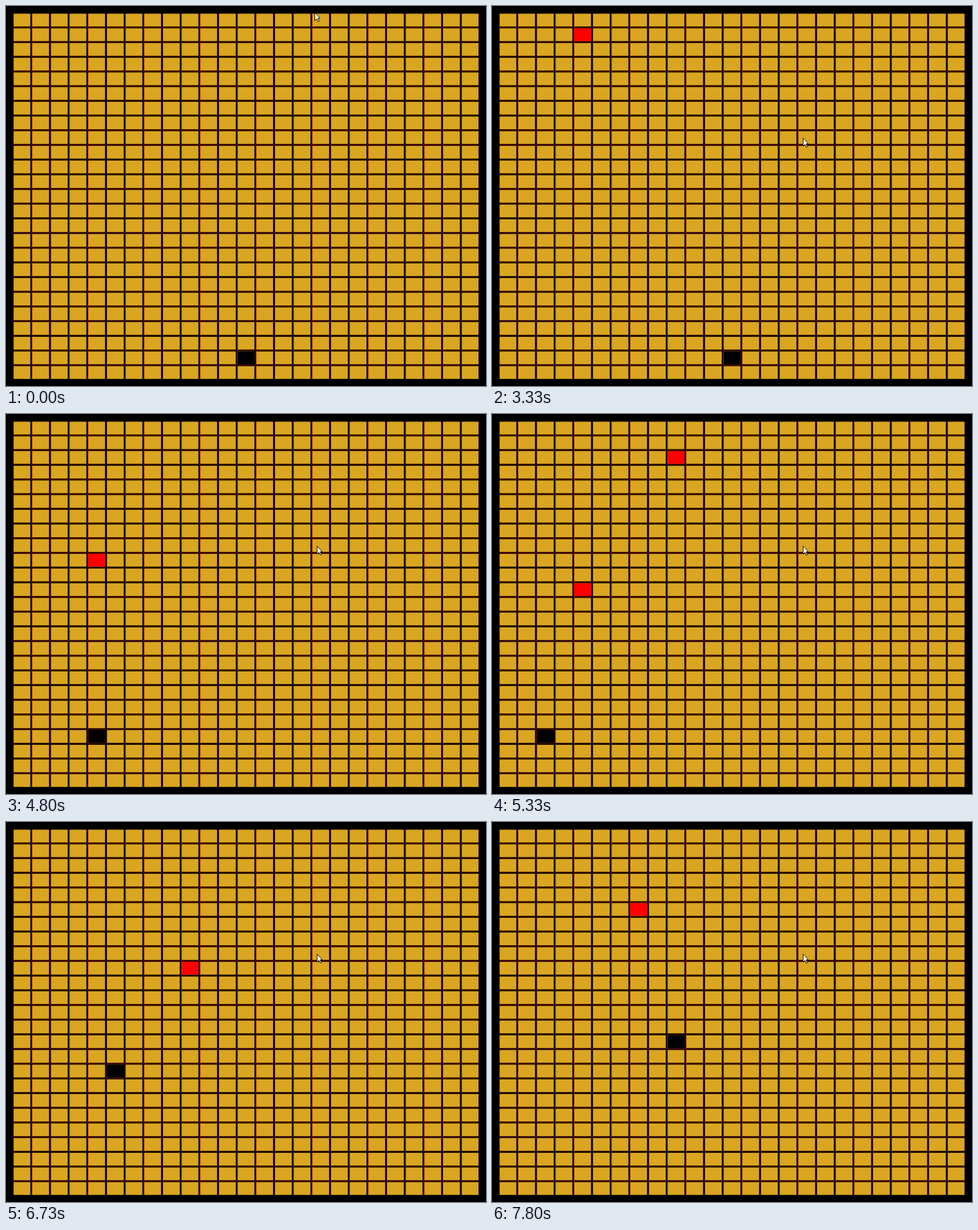
An HTML page with a canvas that plays this animation: 840x666 px, repeating every 8 s.

```html
<!DOCTYPE html>
<html lang="en">
<head>
<meta charset="utf-8">
<title>Grid game</title>
<style>
html, body { margin: 0; width: 100%; height: 100%; overflow: hidden; background: #000; }
canvas { display: block; }
</style>
</head>
<body>
<canvas id="stage" width="840" height="666"></canvas>
<script>
const W = 840, H = 666, LOOP = 8000, FPS = 15, SIZE = 25;
const GOLD = '#daa520', RED = '#ff0000', BLACK = '#000';
const PITCH = { x: 32.68, y: 25.74 };
const CELL = { w: 29.3, h: 22.4 };
const ctx = document.getElementById('stage').getContext('2d');

// Linear interpolation through [time, ...values] keys.
function track(keys, t) {
  const next = keys.findIndex(k => k[0] > t);
  if (next < 0) return keys[keys.length - 1].slice(1);
  if (next === 0) return keys[0].slice(1);
  const a = keys[next - 1], b = keys[next];
  const u = (t - a[0]) / (b[0] - a[0]);
  return a.slice(1).map((v, i) => v + (b[i + 1] - v) * u);
}

// Rows fallen by the first block; each later block starts nine rows behind.
const fall = [[3330, 1], [4130, 6], [4600, 7], [4800, 9], [5130, 10], [6130, 15],
  [6600, 18], [6930, 19], [7800, 23]];
const blocks = [{ col: 4, caught: 17 }, { col: 9, caught: 14 }, { col: 7, caught: SIZE }];

// Player runs: evenly spaced steps, the first at `from`, the last at `to`.
const runs = [
  { from: 3670, to: 3800, steps: 2, dx: 0, dy: -1 },
  { from: 4000, to: 4130, steps: 2, dx: -1, dy: 0 },
  { from: 4600, to: 4900, steps: 9, dx: -1, dy: 0 },
  { from: 5200, to: 5470, steps: 3, dx: 1, dy: 0 },
  { from: 5930, to: 6600, steps: 5, dx: 0, dy: -1 },
  { from: 6730, to: 7330, steps: 5, dx: 1, dy: 0 },
  { from: 7600, to: 7800, steps: 2, dx: 0, dy: -1 }
];

const glide = [[0, 540, 11], [330, 554, 211], [400, 554, 211], [530, 554, 215],
  [600, 553, 215], [1000, 544, 232]];
const arrow = new Path2D('M0 0V14L3.2 11L5.5 16L7.5 15L5.3 10.2L9 10Z');

function cell(g, c, r, color) {
  g.fillStyle = color;
  g.fillRect(13.3 + PITCH.x * c, 13.45 + PITCH.y * r, CELL.w, CELL.h);
}

// A seam shows most where it falls in the middle of a pixel.
function seamColor(pos) {
  const f = pos % 1;
  return `rgba(255, 0, 0, ${0.15 + 1.6 * f * (1 - f)})`;
}

function makeBoard() {
  const board = document.createElement('canvas');
  board.width = W;
  board.height = H;
  const g = board.getContext('2d');
  g.fillStyle = BLACK;
  g.fillRect(0, 0, W, H);
  for (let i = 1; i < SIZE; i++) {
    const x = 12.6 + PITCH.x * i, y = 11.7 + PITCH.y * i;
    g.fillStyle = seamColor(x);
    g.fillRect(Math.floor(x), 13, 1, 641);
    g.fillStyle = seamColor(y);
    g.fillRect(13, Math.floor(y), 814, 1);
  }
  for (let r = 0; r < SIZE; r++)
    for (let c = 0; c < SIZE; c++) cell(g, c, r, GOLD);
  return board;
}

function playerAt(t) {
  let c = 12, r = 23;
  for (const { from, to, steps, dx, dy } of runs) {
    if (t < from) break;
    const n = 1 + Math.floor((steps - 1) * Math.min(1, (t - from) / (to - from)));
    c += dx * n;
    r += dy * n;
  }
  return [c, r];
}

function pointerAt(t) {
  let [x, y] = track(glide, t);
  if (t < 330) x += 15.5 * Math.sin(Math.PI * t / 330);
  if (t >= 1400) x += 0.5;
  if (t >= 2530) y -= 1;
  return [Math.floor(x) + 0.5, Math.floor(y) + 0.5];
}

function drawPointer(t) {
  ctx.save();
  ctx.translate(...pointerAt(t));
  ctx.fillStyle = '#fff';
  ctx.fill(arrow);
  ctx.strokeStyle = BLACK;
  ctx.stroke(arrow);
  ctx.restore();
}

const board = makeBoard();

function draw(t) {
  ctx.drawImage(board, 0, 0);
  if (t >= fall[0][0]) {
    const fallen = Math.floor(track(fall, t)[0]);
    blocks.forEach(({ col, caught }, i) => {
      const row = fallen - 9 * i;
      if (row >= 1 && row < caught) cell(ctx, col, row, RED);
    });
  }
  cell(ctx, ...playerAt(t), BLACK);
  drawPointer(t);
}

const begin = performance.now();
function frame() {
  const t = (performance.now() - begin) % LOOP;
  draw(Math.floor((t + 5) * FPS / 1000) * 1000 / FPS);
  requestAnimationFrame(frame);
}
frame();
</script>
</body>
</html>
```
